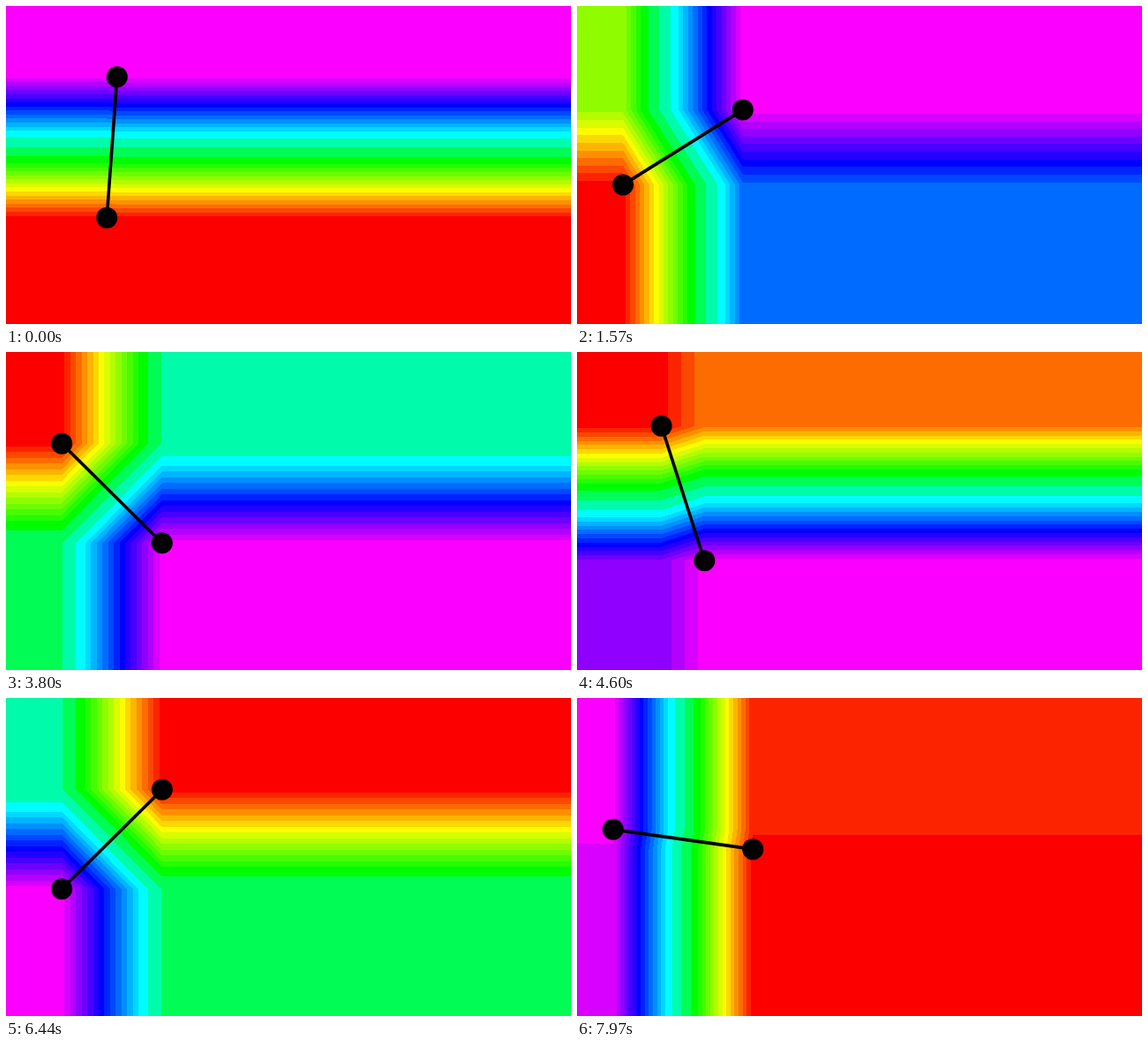
These frames come from a looping animation (640x360 px, 8 s). An HTML page with a canvas:

```html
<!DOCTYPE html>
<html lang="en">
<head>
<meta charset="utf-8">
<title>Clamped gradient</title>
<style>
  html, body { margin: 0; height: 100%; overflow: hidden; }
  canvas { display: block; width: 640px; height: 360px; }
</style>
</head>
<body>
<canvas width="640" height="360"></canvas>
<script>
const W = 640, H = 360;
const LOOP = 8000, STEP = 1000 / 30;
const CENTER = { x: 120, y: 160 }, RADIUS = 80;
const START_ANGLE = 1.643, ANGLE_STEP = 0.02;
const SHADES = 4096;

const ctx = document.querySelector('canvas').getContext('2d');
const image = ctx.createImageData(W, H);
const pixels = new Uint32Array(image.data.buffer);
const clamp = (v, lo, hi) => Math.min(Math.max(v, lo), hi);

// Hue 0 to 300 degrees, reduced to 8 levels of red and green, 4 of blue.
const palette = Uint32Array.from({ length: SHADES + 1 }, (_, i) => {
  const hue = 5 * i / SHADES;
  const channel = (offset) => {
    const k = (offset + hue) % 6;
    return 1 - clamp(Math.min(k, 4 - k), 0, 1);
  };
  const r = Math.round(channel(5) * 7) * 36;
  const g = Math.round(channel(3) * 7) * 36;
  const b = Math.round(channel(1) * 3) * 85;
  return (255 << 24 | b << 16 | g << 8 | r) >>> 0;
});

// One axis of the projection onto the segment, clamped to its extent.
function axisShares(size, from, to, lengthSquared) {
  const lo = Math.min(from, to), hi = Math.max(from, to);
  return Float64Array.from({ length: size }, (_, i) =>
    (clamp(i + 0.5, lo, hi) - from) * (to - from) / lengthSquared * SHADES);
}

function drawField(a, b) {
  const lengthSquared = (b.x - a.x) ** 2 + (b.y - a.y) ** 2;
  const columns = axisShares(W, a.x, b.x, lengthSquared);
  const rows = axisShares(H, a.y, b.y, lengthSquared);
  for (let y = 0, p = 0; y < H; y++) {
    for (let x = 0; x < W; x++) {
      pixels[p++] = palette[clamp(Math.round(columns[x] + rows[y]), 0, SHADES)];
    }
  }
  ctx.putImageData(image, 0, 0);
}

function drawSegment(a, b) {
  ctx.lineWidth = 3.6;
  ctx.beginPath();
  ctx.moveTo(a.x, a.y);
  ctx.lineTo(b.x, b.y);
  ctx.stroke();
  for (const { x, y } of [a, b]) {
    ctx.beginPath();
    ctx.arc(x, y, 12, 0, 2 * Math.PI);
    ctx.fill();
  }
}

function pointAt(angle) {
  return {
    x: CENTER.x + RADIUS * Math.cos(angle),
    y: CENTER.y + RADIUS * Math.sin(angle)
  };
}

let shown = -1;
function render() {
  // A few ms of lead absorb the 10 ms rounding of the step times.
  const step = Math.floor((performance.now() % LOOP + 3.5) / STEP) % 240;
  if (step !== shown) {
    shown = step;
    const angle = START_ANGLE + step * ANGLE_STEP;
    const red = pointAt(angle), magenta = pointAt(angle + Math.PI);
    drawField(red, magenta);
    drawSegment(red, magenta);
  }
  requestAnimationFrame(render);
}
render();
</script>
</body>
</html>
```
